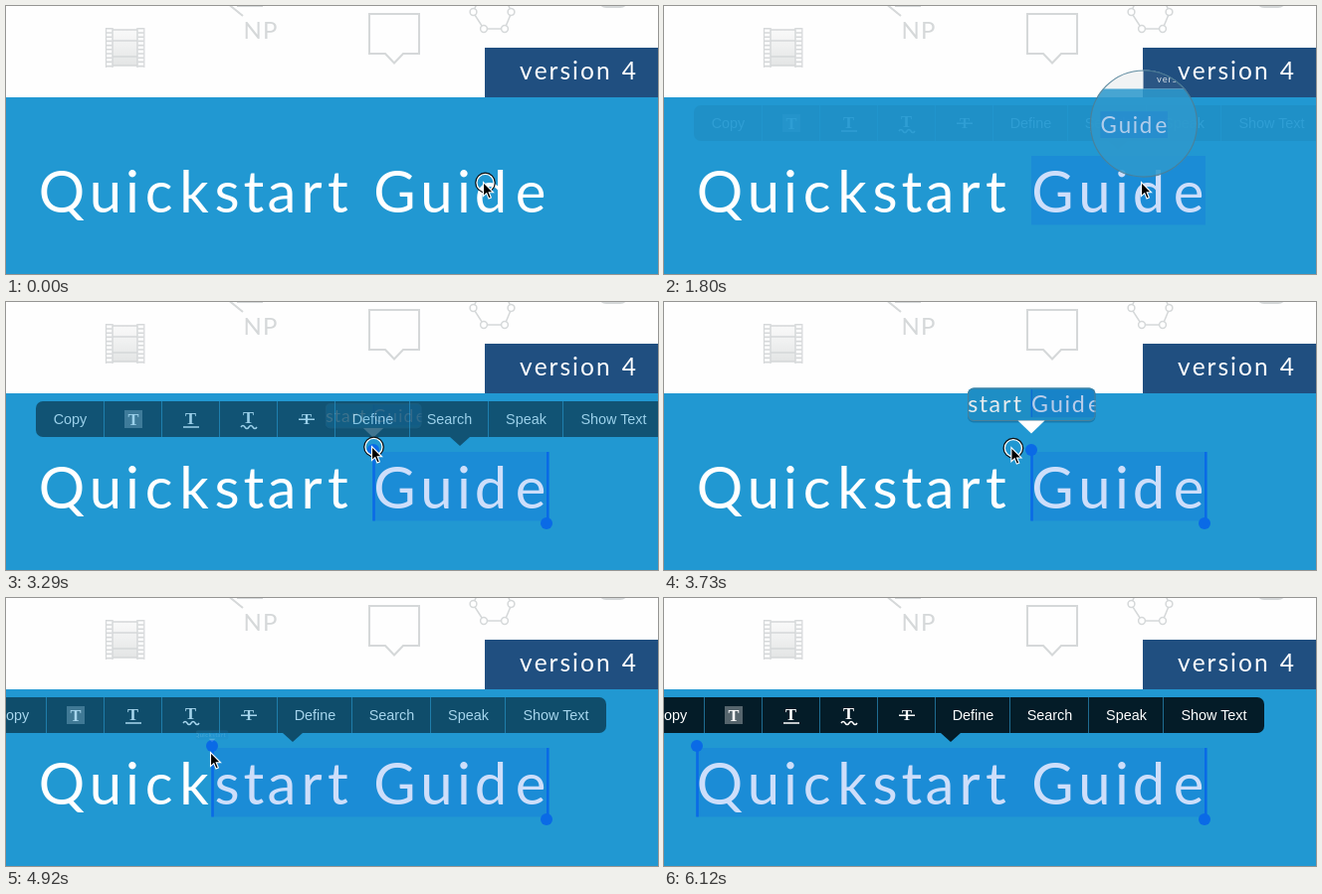
Recreate the animation shown at these times as an HTML page. Size 655x270 px, loop 6.55 s.

```html
<!DOCTYPE html>
<html lang="en">
<head>
<meta charset="utf-8">
<title>Text selection</title>
<style>
  html, body { margin: 0; width: 100%; height: 100%; overflow: hidden; background: #fff; }
  svg { display: block; width: 100%; height: 100%; }
  text { white-space: pre; }
  .head { font-family: Lato, Inter, sans-serif; font-kerning: none; }
  .label { font: 14.4px "Liberation Sans", Inter, sans-serif; text-anchor: middle; fill: #fff; }
  .glyph { font: bold 16.5px "Liberation Serif", "Noto Serif", serif; text-anchor: middle; fill: #fff; }
  .line { fill: none; stroke: #d5d8d9; stroke-width: 2; }
</style>
</head>
<body>
<svg viewBox="0 0 655 270" preserveAspectRatio="none">
  <defs>
    <linearGradient id="film" x1="0" y1="0" x2="0" y2="1">
      <stop offset="0" stop-color="#fafafa"/><stop offset="1" stop-color="#e3e5e5"/>
    </linearGradient>
    <clipPath id="disc"><circle cy="-62.2" r="56.5"/></clipPath>
    <clipPath id="pill"><rect x="-64" y="-62.5" width="128.5" height="33.5" rx="6"/></clipPath>
  </defs>

  <g id="page">
    <rect y="-100" width="800" height="200" fill="#fefefe"/>
    <g>
      <rect x="107" y="23" width="25" height="37" fill="url(#film)"/>
      <path class="line" style="stroke-width:1.5" d="M107 22V62M132 22V62M107 24H132M107 35H132M107 51H132M107 60H132"/>
      <path class="line" style="stroke-width:1.2" d="M100.5 22V62M138.8 22V62"/>
      <path class="line" style="stroke-width:6" stroke-dasharray="1.6 2.6" d="M103.5 22V62M135.5 22V62"/>
      <path class="line" d="M222 -3L238 10M232 0H258"/>
      <path class="line" d="M365 8H415V48H399L390 57.5L381 48H365Z"/>
      <path class="line" style="stroke-width:1.5" d="M476 -8L469 6L480 23H501L508 6L501 -8"/>
      <g fill="#fff" stroke="#d5d8d9" stroke-width="1.5">
        <circle cx="469.5" cy="6" r="3.4"/><circle cx="480" cy="23" r="3.4"/>
        <circle cx="501" cy="23" r="3.4"/><circle cx="507.5" cy="6" r="3.4"/>
      </g>
      <path class="line" d="M598 -1Q600 1 603 1H617Q620 1 622 -1"/>
      <text class="head" x="238.5" y="33" font-size="24" letter-spacing="1.2" fill="#d5d8d9">NP</text>
    </g>
    <rect x="481" y="42" width="320" height="50" fill="#204f80"/>
    <text class="head" x="516" y="74" font-size="24.5" letter-spacing="2" word-spacing="2" fill="#fff">version 4</text>
    <rect y="92" width="800" height="400" fill="#2198d2"/>
    <text class="head" y="208" font-size="58" text-anchor="middle" fill="#fff"
      x="56 100 127 153.5 189 222 249 277 307 333.5 358 390.5 432.5 460 487 527">Quickstart Guide</text>
    <rect id="sel" y="151" height="69.5" fill="#085ae6" fill-opacity=".2"/>
    <path id="bars" stroke="#0a6ae6" stroke-width="2.6"/>
  </g>

  <g id="knobs" fill="#0a6ae6">
    <circle id="knob" cy="149" r="6"/><circle cx="543" cy="223" r="6"/>
  </g>

  <g id="menu">
    <rect x="30" y="100" width="631" height="36" rx="7" fill="#041c28"/>
    <path id="arrow" d="M-10 136H10L0 145Z" fill="#041c28"/>
    <path id="dividers" stroke="#1f6c91"/>
    <g id="labels"></g>
    <rect x="119" y="109" width="18" height="18" fill="#56656d"/>
    <text class="glyph" x="128" y="123.5">T</text>
    <text class="glyph" x="185.5" y="123">T</text>
    <text class="glyph" x="243.5" y="122">T</text>
    <text class="glyph" x="302" y="123" style="font-size:15px">T</text>
    <path fill="none" stroke="#fff" stroke-width="1.5" d="M178 126H194M294 118.3H310M236 126q2 -3 4 0t4 0t4 0t4 0"/>
  </g>

  <g id="lens">
    <g clip-path="url(#disc)">
      <use href="#page" transform="translate(0 -62.2) scale(.403) translate(-482 -183)"/>
      <circle cy="-62.2" r="56.5" fill="#8a9aa2" fill-opacity=".12"/>
    </g>
    <circle cy="-62.2" r="56" fill="none" stroke="#4e7f96" stroke-width="1.3"/>
  </g>

  <g id="mini">
    <rect x="-64" y="-61" width="128.5" height="33.5" rx="6" fill="#003a5c" fill-opacity=".3"/>
    <g clip-path="url(#pill)">
      <use id="zoom" href="#page"/>
      <rect x="-64" y="-63" width="129" height="35" fill="#00324c" fill-opacity=".1"/>
    </g>
    <rect x="-63.5" y="-62" width="127.5" height="32.5" rx="6" fill="none" stroke="#4c7f98"/>
    <path d="M-13.5 -29.5H13.5L0 -16.5Z" fill="#fff"/>
  </g>

  <g id="cursor">
    <g id="ring" fill="none">
      <circle cx="2.5" cy="1" r="8.7" stroke="#fff" stroke-width="1.6"/>
      <circle cx="2.5" cy="1" r="9.8" stroke="#111" stroke-width="1.2"/>
    </g>
    <path d="M.5 .5V14.6L3.8 11.6L6 17L8.4 16L6.2 10.8H10.6Z" fill="#000" stroke="#fff" stroke-width="1.1"/>
  </g>
</svg>
<script>
const LOOP = 6550;
const RIGHT = 544;
const EDGES = [33, 82, 119, 137, 172, 207, 237, 262, 296, 321, 345, 369];
const MOVES = [
  { from: 1950, to: 2700, a: [479, 177], b: [362, 142] },
  { from: 2750, to: 3100, a: [362, 142], b: [367, 145] },
  { from: 3400, to: 4300, a: [367, 145], b: [205, 155] },
  { from: 5220, to: 6120, a: [205, 155], b: [625, 272] }
];
const el = id => document.getElementById(id);
const set = (id, name, value) => el(id).setAttribute(name, value);
const show = (id, alpha) => {
  set(id, 'opacity', alpha);
  set(id, 'display', alpha > 0 ? 'inline' : 'none');
};

el('labels').innerHTML = [['Copy', 64.5], ['Define', 368.5], ['Search', 445.5], ['Speak', 522.5], ['Show Text', 610.5]]
  .map(([word, x]) => `<text class="label" x="${x}" y="122.5">${word}</text>`).join('');
set('dividers', 'd', [98.5, 156.5, 214.5, 272.5, 330.5, 405.5, 484.5, 559.5].map(x => `M${x} 100V136`).join(''));

// The picture advances in steps of about 150 ms.
const stepStart = n => 150 * n - 10 * ((n > 21) + (n > 25) + (n > 27));
function stepAt(t) {
  let n = 0;
  while (n < 41 && stepStart(n + 1) <= t) n++;
  return n;
}

function pointer(n) {
  const t = stepStart(n);
  const m = MOVES.filter(m => m.from <= t).pop();
  if (!m) return MOVES[0].a;
  const p = Math.min(1, (t - m.from) / (m.to - m.from));
  const e = p * p * (3 - 2 * p);
  return m.a.map((v, k) => v + (m.b[k] - v) * e);
}

// The left edge snaps to letters and trails the pointer by one step.
function leftEdge(n) {
  if (n >= 34) return 33;
  if (n < 23) return 369;
  const x = pointer(n - 1)[0] + 2;
  return EDGES.reduce((best, e) => Math.abs(e - x) < Math.abs(best - x) ? e : best);
}

function menuAlpha(n) {
  if (n < 12) return 0;
  if (n < 22) return n === 12 ? 0.06 : n === 13 ? 0.65 : 1;
  if (n === 22) return 0.55;
  return n < 33 ? 0 : n === 33 ? 0.6 : 1;
}

// Each magnifier gives [scale, alpha].
function lensState(n) {
  if (n === 9) return [0.65, 0.8];
  if (n === 12) return [0.956, 0.88];
  return n === 10 || n === 11 ? [1, 1] : [1, 0];
}

function miniState(n) {
  if (n === 22) return [0.75, 0.2];
  if (n === 33) return [0.25, 0.2];
  return n > 22 && n < 33 ? [1, 1] : [1, 0];
}

function draw(n) {
  const [px, py] = pointer(n);
  const left = leftEdge(n);
  const handles = n >= 13 ? 1 : 0;

  show('sel', n >= 9 ? 1 : 0);
  set('sel', 'x', left);
  set('sel', 'width', RIGHT - left);
  show('bars', handles);
  set('bars', 'd', `M${left + 0.5} 151V220.5M${RIGHT + 0.3} 151V220.5`);
  show('knobs', handles);
  set('knob', 'cx', left);

  const moved = n > 26;
  show('menu', menuAlpha(n));
  set('menu', 'transform', `translate(${moved ? -58 : 0} 0)`);
  set('arrow', 'transform', `translate(${moved ? 346 : 456} 0)`);

  const [lensScale, lensAlpha] = lensState(n);
  show('lens', lensAlpha);
  set('lens', 'transform', `translate(482 178) scale(${lensScale})`);

  const [miniScale, miniAlpha] = miniState(n);
  show('mini', miniAlpha);
  set('mini', 'transform', `translate(${left} 149) scale(${miniScale})`);
  set('zoom', 'transform', `translate(0 -45.5) scale(.4) translate(${-left} -189)`);

  const pressed = n === 0 || (n >= 6 && n < 12) || (n >= 21 && n < 32);
  show('ring', pressed ? 1 : 0);
  show('cursor', n < 41 ? 1 : 0);
  set('cursor', 'transform', `translate(${px} ${py})`);
}

const begin = performance.now();
let last = -1;
function frame() {
  const n = stepAt((performance.now() - begin) % LOOP);
  if (n !== last) draw(last = n);
  requestAnimationFrame(frame);
}
frame();
</script>
</body>
</html>
```
